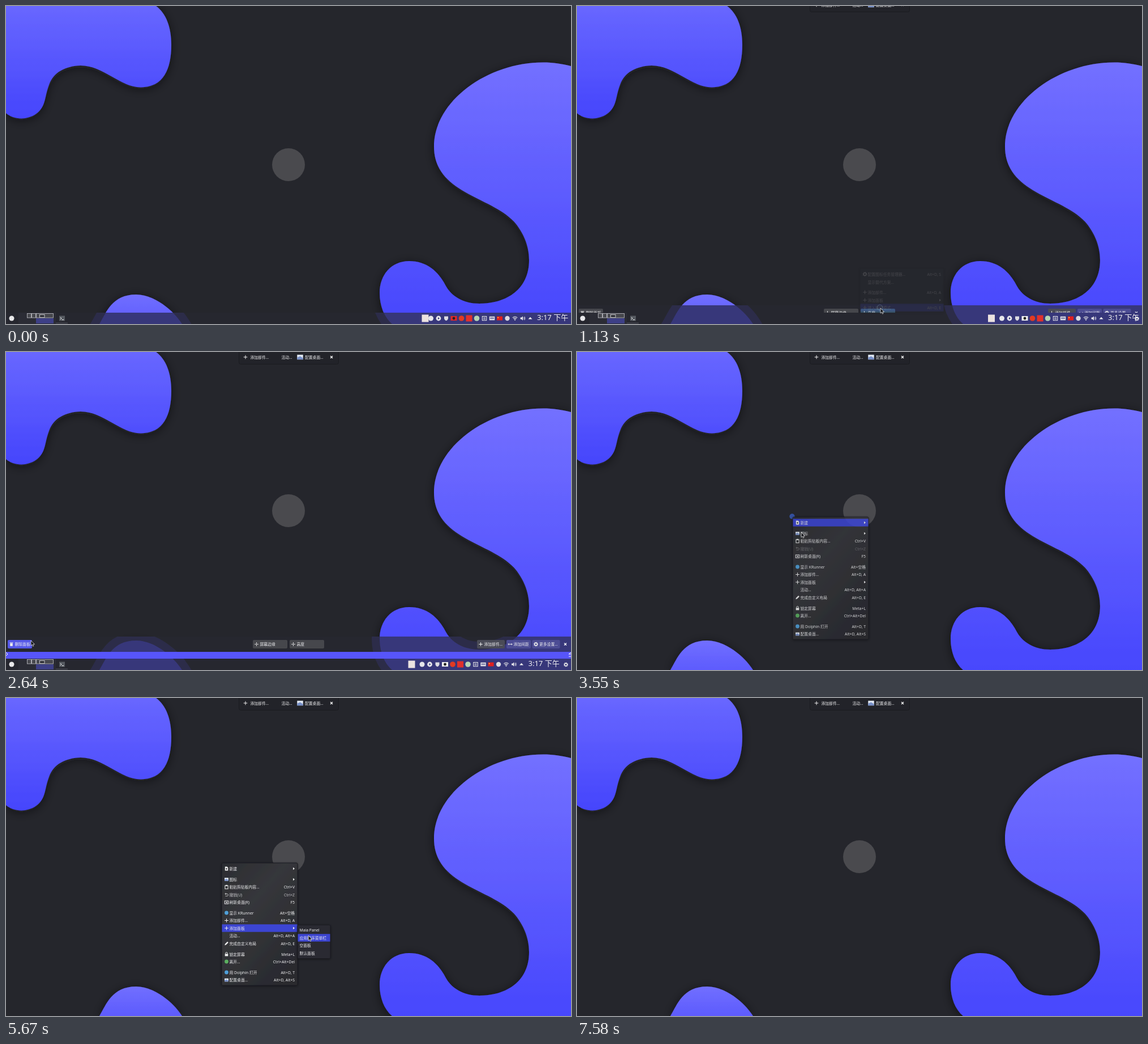
These frames come from a looping animation (998 px wide and 561 px high, 8000 ms). An HTML page:

```html
<!DOCTYPE html>
<html lang="zh">
<head>
<meta charset="utf-8">
<title>Desktop panel setup</title>
<style>
html, body { margin: 0; width: 100%; height: 100%; overflow: hidden; background: #25262c; }
svg { display: block; width: 100vw; height: 100vh; }
text { font-family: 'Noto Sans', 'Noto Sans CJK SC', 'Noto Sans CJK', sans-serif; font-size: 6.8px; fill: #f0f0f2; white-space: pre; }
</style>
</head>
<body>
<svg id="stage" viewBox="0 0 998 561"></svg>
<script>
const LOOP = 8000;
const stage = document.getElementById('stage');
const $ = id => document.getElementById(id);

// ---- markup helpers ----
const rect = (x, y, w, h, fill, more = '') =>
  `<rect x="${x}" y="${y}" width="${w}" height="${h}" fill="${fill}" ${more}/>`;
const circle = (x, y, r, fill, more = '') =>
  `<circle cx="${x}" cy="${y}" r="${r}" fill="${fill}" ${more}/>`;
const path = (d, fill, more = '') => `<path d="${d}" fill="${fill}" ${more}/>`;
const line = (d, color = '#eee', w = 1) =>
  path(d, 'none', `stroke="${color}" stroke-width="${w}"`);
const text = (x, y, s, more = '') => `<text x="${x}" y="${y + 2.5}" ${more}>${s}</text>`;
const at = (x, y, body) => `<g transform="translate(${x} ${y})">${body}</g>`;
const group = (id, body, more = '') => `<g id="${id}" ${more}>${body}</g>`;

// ---- small icons, centred on 0,0 ----
const picture = rect(-3.5, -2.8, 7, 5.6, '#dfe6f0') + path('M-3.5 2.8V.5L0-1 3.5 1.2V2.8Z', '#7890c8');
const gear = circle(0, 0, 2.3, 'none', 'stroke="#eee" stroke-width="1.4"') +
  circle(0, 0, 3.4, 'none', 'stroke="#eee" stroke-width="1.1" stroke-dasharray="1.33 1.34"');
const icon = {
  doc: path('M-2.7-3.5H1L2.8-1.6V3.5H-2.7Z', '#eee') + line('M0-1.2V2M-1.6.4H1.6', '#2e2f34', .9),
  picture, gear,
  paste: rect(-2.6, -2.6, 5.2, 5.8, 'none', 'stroke="#eee"') + rect(-1.5, -3.7, 3, 2, '#eee'),
  undo: line('M-2.5-1.5H1A1.9 1.9 0 0 1 1 2.4H-2') + path('M-3.2-1.5L-.8-3.4V.4Z', '#eee'),
  reload: rect(-3.2, -2.6, 6.4, 5.2, 'none', 'stroke="#eee"') + rect(-1, -.9, 2.4, 2, '#eee'),
  blue: circle(0, 0, 3.4, '#4f9fd8'),
  green: circle(0, 0, 3.4, '#5bb060'),
  plus: line('M0-3.3V3.3M-3.3 0H3.3'),
  pencil: path('M-3.2 3.2L-2.5.8 1.6-3.3 3.3-1.6-.8 2.5Z', '#eee'),
  lock: rect(-2.8, -.6, 5.6, 4, '#eee') + line('M-1.7-.5V-1.7A1.7 1.7 0 0 1 1.7-1.7V-.5'),
  move: line('M0-3.2V-1M0 1V3.2M-3.2 0H-1M1 0H3.2', '#eee', 1.1) + circle(0, 0, .7, '#eee'),
  trash: rect(-2.3, -1.7, 4.6, 5, '#eee') + rect(-3, -3.2, 6, 1, '#eee'),
  spread: line('M-3.5 0H3.5M-2-1.6L-3.6 0-2 1.6M2-1.6L3.6 0 2 1.6', '#eee', .9),
  close: line('M-2-2L2 2M2-2L-2 2', '#fff', 1.2),
  none: ''
};

// ---- wallpaper ----
const blobs = [
  ['M265 0C283 13 292 38 292 68C292 112 278 143 238 143.5C202 143.5 172 105 132 105C104 106 84 117 76 139C70 155 70 165 66 174C60 189 45 198 27 198.5C17 198.5 7 195 0 189V0Z', 0, 198, '#6867ff', '#4545fc'],
  ['M998 106C982 102 966 99.5 949 99.5C850 99.5 756 168 756 248C756 330 856 336 897 380C914 399 924 423 924 448C924 500 884 525 836 525C808 525 787 512 777 494C764 468 743 450 712 450C680 450 660 475 660 506C660 529 668 549 682 561H998Z', 100, 561, '#7370ff', '#4747fd'],
  ['M165 561C177 541 187 509 230 509C262 509 296 537 311 561Z', 509, 590, '#716fff', '#5250fc']
];
const gradients = blobs.map(([, y1, y2, a, b], i) =>
  `<linearGradient id="g${i}" gradientUnits="userSpaceOnUse" x1="0" x2="0" y1="${y1}" y2="${y2}">
   <stop stop-color="${a}"/><stop offset="1" stop-color="${b}"/></linearGradient>`).join('');
const wallpaper = rect(0, 0, 998, 561, '#25262c') +
  `<g filter="url(#soft)">${blobs.map((b, i) => path(b[0], `url(#g${i})`)).join('')}</g>` +
  circle(499, 280, 29, '#4a4a4e');

// ---- panel ----
const lower = blobs.slice(1).map(b => b[0]).join('');
const glass = rect(0, 490, 998, 71, '#26272f') +
  path(lower, '#2c2c49', 'stroke="#2c2c49" stroke-width="28"') + path(lower, '#37377a');

const pager = rect(22, 541, 66, 20, '#2b2c35') + rect(53, 551, 31, 9, '#3d3f86') +
  [[37, 8], [45, 8], [53, 31]].map(([x, w]) =>
    rect(x + .5, 542.5, w - 1, 7.5, '#46474d', 'stroke="#c4c4ca" stroke-width=".8"')).join('') +
  rect(59.5, 544.5, 8.5, 5, '#33343a', 'stroke="#e4e4e8" stroke-width=".8"');
const taskbar = circle(10, 551, 4.5, '#e8e8ea') + pager +
  rect(94, 546.5, 10, 9, '#565a61') + line('M96 549L98 551 96 553M99 553.5H102', '#fff', .9) +
  rect(88, 558.8, 21, 1, '#565862');

const trayIcons = [
  circle(0, 0, 4.5, '#e6e6ea'),
  circle(0, 0, 4.4, '#e6e6ea') + path('M-1-2L2 0-1 2Z', '#37377a'),
  path('M-3.5-3.5H3.5V.5Q3 3 0 4.2-3 3-3.5.5Z', '#dcdce2'),
  rect(-5.5, -4, 11, 8, '#eee', 'id="rec"') + circle(0, 0, 2.4, '#222'),
  circle(0, 0, 4.8, '#e23a22'),
  rect(-5.5, -5.5, 11, 11, '#e0302c'),
  circle(0, 0, 4.8, '#b5d6b4'),
  rect(-3.7, -3.5, 7.4, 7.2, 'none', 'stroke="#eee"') + line('M-2-1H2M-2 1.3H2'),
  rect(-4.7, -3.3, 9.4, 6.6, '#e6e6ea') + line('M-3.5-1.2H3.5M-3.5.5H3.5', '#37377a', .8),
  rect(-5, -3.5, 10, 7, '#e02020') + circle(-2.8, -1.3, 1, '#ffd83a'),
  circle(0, 0, 4.2, '#dcdce2'),
  line('M-4.2-1Q0-4.8 4.2-1M-2.6 1Q0-1.5 2.6 1', '#d0d0da', 1.2) + circle(0, 2.6, 1.1, '#eee'),
  path('M-4-1.4H-2L.5-3.7V3.7L-2 1.4H-4Z', '#e6e6ea') + line('M2-2Q3.4 0 2 2M3.3-3.2Q5.4 0 3.3 3.2', '#e6e6ea', .9),
  path('M-3.5 1.6L0-2.2 3.5 1.6Z', '#eee')
];
const tray = trayIcons.map((s, i) => at(750.5 + i * 13.5, 551, s)).join('') +
  text(938, 551.8, '3:17 下午', 'style="font-size:13px"');

// ---- edit mode bars ----
const button = (x, w, kind, label, fill, id = '') =>
  rect(x, 508, w, 15, fill, `rx="2" ${id}`) + at(x + 6.5, 515.5, icon[kind]) + text(x + 12.5, 515.7, label);
const ruler = rect(0, 529, 998, 12, '#5755fa') +
  line('M0 530L3 533 0 536M998 530L994 533H998M994 537H998', '#fff', 1);
const editBar = button(3, 43, 'trash', '删除面板', '#46474d', 'id="del"') +
  button(436, 61, 'move', '屏幕边缘', '#46474c') +
  button(501, 61, 'move', '高度', '#46474c', 'id="high"') +
  button(832, 49, 'plus', '添加部件...', '#4a4b57') +
  button(884, 43, 'spread', '添加间距', '#4c4c94') +
  button(929.5, 49, 'gear', '更多设置...', '#4c4c94') +
  at(988, 515.5, icon.close) + ruler;
const topBar = rect(411.5, -4, 176, 25.5, '#222329', 'rx="3" stroke="#1b1c20"') +
  at(423, 9, icon.plus) + text(431.5, 9.2, '添加部件...') + text(486.5, 9.2, '活动...') +
  at(519.5, 9, `<g transform="scale(1.5)">${picture}</g>`) + text(528, 9.2, '配置桌面...') + at(575, 9, icon.close);

// ---- menus: [y, icon, label, shortcut]; '>' marks a submenu ----
const desktopRows = [
  [301, 'doc', '新建', '>'], [320, 'picture', '图标', '>'],
  [333.5, 'paste', '粘贴剪贴板内容...', 'Ctrl+V'], [347, 'undo', '撤销(U)', 'Ctrl+Z'],
  [360.5, 'reload', '刷新桌面(R)', 'F5'], [379, 'blue', '显示 KRunner', 'Alt+空格'],
  [392.5, 'plus', '添加部件...', 'Alt+D, A'], [406, 'plus', '添加面板', '>'],
  [419.5, 'none', '活动...', 'Alt+D, Alt+A'], [433, 'pencil', '完成自定义布局', 'Alt+D, E'],
  [452, 'lock', '锁定屏幕', 'Meta+L'], [465, 'green', '离开...', 'Ctrl+Alt+Del'],
  [484, 'blue', '用 Dolphin 打开', 'Alt+D, T'], [497.5, 'picture', '配置桌面...', 'Alt+D, Alt+S']
];
const panelRows = [
  [409.5, 'none', 'Maia Panel'], [423, 'none', '应用程序菜单栏'],
  [436.5, 'none', '空面板'], [450, 'none', '默认面板']
];
const taskRows = [
  [473, 'gear', '配置图标任务管理器...', 'Alt+D, S'], [487, 'none', '显示替代方案...'],
  [505, 'plus', '添加部件...', 'Alt+D, A'], [519, 'plus', '添加面板', '>'],
  [532, 'plus', '进入编辑模式', 'Alt+D, E']
];
function menu(id, x, y, w, h, rows, indent, fill) {
  const right = x + w - 5;
  const items = rows.map(([ry, kind, label, key], i) => {
    const tail = !key ? '' : key === '>' ? path(`M${right - 3} ${ry - 2.3}L${right} ${ry} ${right - 3} ${ry + 2.3}Z`, '#eee')
      : text(right, ry, key, 'text-anchor="end"');
    return group(id + i, at(x + 8.5, ry, icon[kind]) + text(x + indent, ry, label) + tail);
  }).join('');
  return group(id, rect(x, y, w, h, fill, 'rx="2" stroke="#1c1d21" filter="url(#drop)"') +
    rect(x + .5, 0, w - 1, 13.4, '#3c45d2', `id="${id}Hl"`) + items);
}

stage.innerHTML = `<defs>${gradients}
  <linearGradient id="sheet" x1="0" y1="0" x2=".7" y2="1"><stop stop-color="#2b2c31"/><stop offset=".4" stop-color="#36373b"/><stop offset="1" stop-color="#292a2f"/></linearGradient>
  <filter id="soft" x="-10%" y="-10%" width="120%" height="120%"><feDropShadow dx="0" dy="3" stdDeviation="9" flood-color="#101010" flood-opacity=".55"/></filter>
  <filter id="drop" x="-10%" y="-10%" width="120%" height="120%"><feDropShadow dx="0" dy="1" stdDeviation="2" flood-opacity=".45"/></filter>
  <clipPath id="glassClip"><rect id="glassBox" width="998" height="61"/></clipPath>
  <clipPath id="aboveClip"><rect y="490" width="998" height="51"/></clipPath></defs>` +
  wallpaper + group('topBar', topBar) +
  group('panel',
    `<g clip-path="url(#glassClip)">${glass}</g>` +
    `<g clip-path="url(#aboveClip)">${group('editBar', editBar)}</g>` +
    taskbar + rect(0, 544.5, 12, 13, '#ebe2e0', 'id="square"') + group('tray', tray) +
    group('gear', at(989, 551.5, gear))) +
  circle(380, 290, 4.7, '#34509f', 'id="dot"') +
  menu('task', 500, 463, 148, 77, taskRows, 13.5, '#2c2d36') +
  menu('main', 381, 291, 134, 216, desktopRows, 13.5, 'url(#sheet)') +
  menu('sub', 515, 400.5, 58, 59, panelRows, 3.5, '#2a2b30') +
  circle(0, 0, 5, 'none', 'id="ring" stroke="#7f9fb0" stroke-width=".8"') +
  group('cursor', path('M0 0V9L2.1 7.1 3.5 10.2 5 9.5 3.7 6.6H6.5Z', '#15161a', 'stroke="#f2f2f2" stroke-width=".7"'));

// ---- timing ----
// Bursts of screen updates: [first, last, count]; the picture rests between them.
const bursts = [
  [70, 70, 1], [280, 1060, 12], [1130, 1900, 14], [1940, 2730, 14], [2770, 3550, 14], [3610, 4090, 9],
  [4900, 4960, 2], [5250, 6030, 14], [6090, 6210, 3], [6660, 7100, 8], [7460, 7580, 3]
];
function held(t) {
  let last = 0;
  for (const [a, b, n] of bursts) {
    if (t < a) break;
    const step = (b - a) / (n - 1 || 1);
    last = t >= b ? b : a + Math.floor((t - a) / step + 1e-6) * step;
  }
  return last;
}
const ramp = (t, a, b) => Math.min(1, Math.max(0, (t - a) / (b - a)));
const ease = p => p * p * (3 - 2 * p);

const route = [
  [280, 560, 546], [420, 500, 546], [640, 500, 546], [1000, 536, 533], [1450, 536, 533],
  [1900, 380, 500], [2200, 150, 470], [2450, 44, 509], [2670, 44, 509], [2770, 82, 452],
  [3180, 380, 290], [3400, 380, 290], [3550, 396, 318], [4040, 471, 392], [4850, 471, 392],
  [4960, 471, 402], [5240, 471, 402], [5400, 545, 404], [5520, 590, 412], [5670, 534, 419],
  [5850, 538, 426], [6030, 541, 434], [6090, 541, 434], [6210, 528, 435], [7400, 528, 435],
  [7460, 420, 437], [7520, 217, 439]
];
function pointer(t) {
  const i = route.findIndex(k => k[0] > t);
  if (i < 0) return route[route.length - 1].slice(1);
  if (!i) return route[0].slice(1);
  const [a, ax, ay] = route[i - 1], [b, bx, by] = route[i];
  const p = ease(ramp(t, a, b));
  return [ax + (bx - ax) * p, ay + (by - ay) * p];
}
const nearest = (rows, y) => rows.reduce((best, r, i) =>
  Math.abs(r[0] - y) < Math.abs(rows[best][0] - y) ? i : best, 0);

const set = (id, name, v) => $(id).setAttribute(name, v);
function fade(id, v) {
  set(id, 'opacity', v);
  set(id, 'display', v > 0 ? 'inline' : 'none');
}
const shift = (id, x, y) => set(id, 'transform', `translate(${x} ${y})`);
const mark = (id, rows, i) => set(id + 'Hl', 'y', rows[i][0] - 6.7);

function draw(now) {
  const t = held(now);
  const [x, y] = pointer(t);

  const drop = 39 * (1 - ramp(t, 1060, 1270));
  shift('editBar', 0, drop);
  set('glassBox', 'y', Math.min(541, 502 + drop));
  shift('topBar', 0, -22 * (1 - ramp(t, 1060, 1200)));
  fade('topBar', t > 1060 ? 1 : 0);
  fade('panel', 1 - ramp(t, 2700, 2840));

  const slide = t > 1180 ? -15.5 : 0;
  shift('tray', slide, 0);
  set('square', 'x', (t < 70 ? 734.5 : 726) + slide);
  set('rec', 'fill', t < 280 ? '#e02828' : '#eeeeee');
  fade('gear', t >= 1130 ? 1 : 0);
  set('del', 'fill', y > 500 && x < 50 ? '#5558e8' : '#46474d');
  set('high', 'fill', t < 1450 ? '#3c5a72' : '#46474c');

  fade('task', ramp(t, 440, 560) * (1 - ramp(t, 1050, 1144)));
  mark('task', taskRows, nearest(taskRows, y));

  const leave = 1 - ramp(t, 6600, 6900);
  fade('main', ramp(t, 3370, 3580) * leave);
  mark('main', desktopRows, t < 3600 ? 0 : t >= 5250 ? 7 : nearest(desktopRows, y));
  set('main3', 'opacity', t < 3600 ? .3 : .75);
  fade('sub', ramp(t, 5240, 5400) * leave);
  mark('sub', panelRows, nearest(panelRows, y));

  fade('dot', t >= 3370 ? 1 - ramp(t, 3560, 3760) : 0);
  const clicks = [[430, 500, 546], [1050, 535, 532], [2600, 44, 509], [6650, 528, 435]];
  const hit = clicks.find(c => t > c[0] && t < c[0] + 300 && c[0] !== 2600 || t > 2640 && t < 2760 && c[0] === 2600);
  fade('ring', hit ? .7 * (1 - ramp(t, hit[0], hit[0] + 300)) : 0);
  if (hit) {
    shift('ring', hit[1], hit[2]);
    set('ring', 'r', 4 + 3 * ramp(t, hit[0], hit[0] + 300));
  }

  shift('cursor', x, y);
  fade('cursor', t >= 280 && t < 7580 ? 1 : 0);
}

const start = performance.now();
function tick() {
  draw((performance.now() - start) % LOOP);
  requestAnimationFrame(tick);
}
tick();
</script>
</body>
</html>
```
